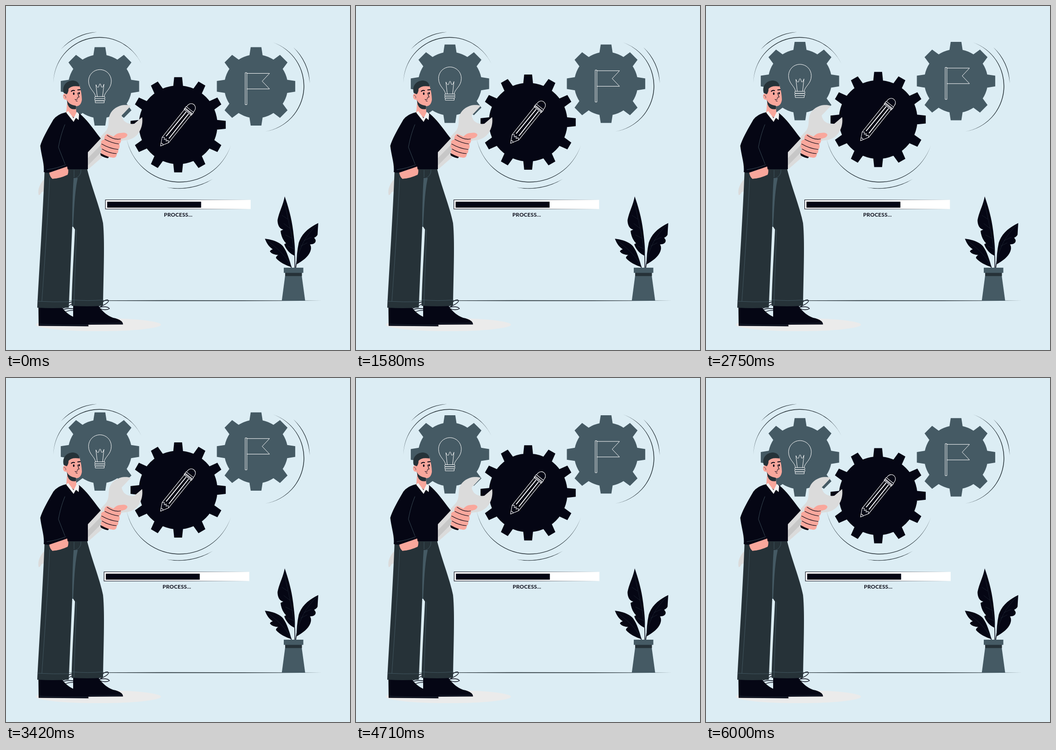
Animation of 748x748 px, one loop 6.04 s. Source, as an HTML page:

```html
<!DOCTYPE html>
<html lang="en">
<head>
<meta charset="utf-8">
<title>Process</title>
<style>
  html, body { margin: 0; width: 100%; height: 100%; overflow: hidden; background: #dcedf4; }
  svg { display: block; width: 100vw; height: 100vh; stroke-width: 1.1; }
  .ink { fill: #050614; }
  .slate { fill: #263238; }
  .steel { fill: #455a64; }
  .skin { fill: #f9a79c; }
  .metal { fill: #dbdbdb; }
  .icon { fill: none; stroke: #fff; stroke-linejoin: round; stroke-linecap: round; }
  .line { fill: none; stroke: #263238; stroke-linecap: round; }
  .dark { fill: none; stroke: #050614; stroke-linecap: round; }
  .seam { fill: none; stroke: #455a64; stroke-linecap: round; }
  text { font: 700 11.7px Lato, "Open Sans", sans-serif; letter-spacing: .25px; text-anchor: middle; }
</style>
</head>
<body>
<svg viewBox="0 0 748 748">
  <defs>
    <linearGradient id="fade" gradientUnits="userSpaceOnUse" x1="216" y1="0" x2="532" y2="0">
      <stop offset="0" stop-color="#050614"/>
      <stop offset=".5" stop-color="#050614" stop-opacity=".75"/>
      <stop offset="1" stop-color="#050614" stop-opacity="0"/>
    </linearGradient>
  </defs>

  <ellipse cx="201" cy="693" rx="136" ry="14" fill="#ebebeb"/>
  <path class="slate" d="M60 640.5Q374 639 687 640.8Q374 642.4 60 640.5Z"/>
  <g id="arcs" class="slate"></g>

  <g id="gears">
    <path id="left" class="steel"/>
    <path id="right" class="steel"/>
    <path id="middle" class="ink"/>

    <g class="icon" stroke-width="1">
      <path d="M194.500 197C194 186 179.500 181 179.500 163A24.700 24.700 0 0 1 229 163C229 181 214.500 186 213.500 197"/>
      <path d="M198.500 197L195.500 171Q200 182 202.500 173Q204.500 165 206.500 173Q209 182 213 170L210 197"/>
      <rect x="193" y="197" width="22" height="4.500" rx="1.500"/>
      <rect x="193" y="201.500" width="22" height="4.500" rx="1.500"/>
      <path d="M194.500 206H213.500V210.500H194.500Z"/>
    </g>
    <g class="icon" stroke-width="1">
      <rect x="520.500" y="145" width="3.300" height="69.500"/>
      <path d="M524 146.500H573L557 163.500L573 180.300H524"/>
    </g>
    <g class="icon" transform="translate(336 304.500) rotate(-51.200)">
      <path d="M0 0L17 -9.200H96V9.200H17Z"/>
      <path d="M17 -9.200L20 -5.500L16 -2.500L20 0L16 2.500L20 5.500L17 9.200M5.500 -3L7 0L5.500 3"/>
      <path stroke-width="1.900" d="M25 -3.800L92 -3.200M25 4L92 3.600"/>
      <rect x="94" y="-10.500" width="4" height="21" rx="1.500"/>
      <rect x="98" y="-10.500" width="4" height="21" rx="1.500"/>
      <path d="M102 -9.500H106C119 -8.500 119 8.500 106 9.500H102"/>
    </g>
  </g>

  <g id="bar">
    <path fill="#fff" d="M216 421.500H532V441.500H216Z"/>
    <path fill="none" stroke="url(#fade)" d="M532 421.500H216.200V441.500H532"/>
    <path class="ink" d="M220 425.500H424.300V438.500H220Z"/>
    <text class="ink" x="374.500" y="458">PROCESS...</text>
  </g>

  <g id="plant">
    <path class="dark" stroke-width="1.500" d="M628 570C629 545 627 525 621 495M621 570C613 549 600 533 582 520M630 570C632 547 641 527 656 504"/>
    <path class="ink" d="M606 414C613 434 621 460 624.500 490C627 510 629 528 628 543C618 540 608 528 605 518L609 516C602 509 598 499 597 489L603 486C594 485 590 474 590.500 465C594 447 603 432 606 414Z"/>
    <path class="ink" d="M679 472C660 481 643 494 636.500 515C633 531 632 547 631.500 562C645 554 657 546 662 533Q665 524 661 518.500Q669 518 671.500 515Q676 510 670 504Q676 501 677.500 497Q678 486 679 472Z"/>
    <path class="ink" d="M563 506C579 508 594 513 602 522C611 534 616 551 621 568C609 564 594 557 587 548Q587 544 592 541.500Q579 541 574 534Q574 531 580 529C571 523 567 516 563 506Z"/>
    <g class="seam" stroke-width=".5" opacity=".6">
      <path d="M605 425C612 460 624 505 627.500 540M677 475C651 500 637 526 632 560M565 508C587 524 607 541 620 566"/>
      <path d="M612 463L600 455M617 483L604 473M622 505L608 498M626 528L613 522M641 522L655 515M648 510L664 503"/>
    </g>
    <path class="steel" d="M607 586H643L650.500 641H599.700Z"/>
    <path class="slate" d="M607 580H643.500V587.300H607Z"/>
    <path class="steel" d="M604 569H646.500V580.300H604Z"/>
  </g>

  <g id="wrench" class="metal">
    <path d="M271.500 217C254 211 233 220 226 236C221 247 226 261 217 272L174 319V354H180L246 297C252 290 260 294 272 289C289 283 299 262 296 241.500L279 256Q266 258 257 250Q252 244 251.500 238Z"/>
    <path fill="#c7c7c7" d="M176 333L214 294L222 302L177 348Z"/>
    <path d="M88 372C75 383 68 397 71 411Q75 411 77 405Q83 403 88 399Z"/>
  </g>

  <g id="shoes">
    <path class="ink" d="M146 652L201 652C210 665 220 673 233 678Q254 682 254.500 692.500L176 693L146 682Z"/>
    <path class="ink" d="M70.500 656L121 655C133 670 143 676 161 681Q179 686 179.500 696.500L71 695.500Z"/>
    <path class="seam" stroke-width=".5" d="M72 692Q125 695 178 693.500M181 690Q220 691 253 689.500"/>
    <path class="dark" stroke-width="1.300" d="M118 657Q134 644 146 643Q148 648 122 658M122 661Q137 655 151 660M127 666Q137 661 148 662"/>
    <path class="dark" stroke-width="1.300" d="M200 655Q213 638 221 639Q229 643 203 655Q221 652 225 658Q217 663 204 658"/>
  </g>

  <g id="trousers">
    <path class="slate" d="M146 353H176C185 390 205 440 211 472C215 510 212 580 211 652Q177 654 142.500 652C144 590 148 530 150 486L144 477Z"/>
    <path class="slate" d="M84 353H170L157 395C148 420 147 445 144 480L136.500 656Q101 658 68 656C72 575 81 440 84 353Z"/>
    <path class="steel" d="M147 374L156 374C150 400 148 440 146 480H144C144 440 145 405 147 374Z"/>
    <path class="seam" stroke-width=".9" d="M153 487C152 540 149 600 148 650M95 374C91 460 83 570 78 642M69 642Q104 644 137 643M144 639Q178 642 211 639M163 356Q164 370 150 375M148 357V372"/>
  </g>

  <g id="body">
    <path class="skin" d="M94 362L132 346Q138 358 134 367Q117 375 101 376Q95 371 94 362Z"/>
    <path class="line" d="M101 376.500Q119 376 134 368"/>
    <path class="skin" d="M133 208L152 218L153 233L147 246L131 233Z"/>
    <path class="ink" d="M131 231Q112 235 103 247C92 266 79 288 74.500 304C77 326 84 344 82 361Q90 364 98 361L133 349L134 355H178V318L206 288C190 268 179 250 159 233L151 245Z"/>
    <path class="seam" stroke-width=".8" d="M128 258C121 275 117 291 114 307Q121 325 128 343M89 356Q111 353 130 345"/>
    <path fill="#f2f2f2" d="M131 232L135 228L147 244L154 230L159 235L158 248L152 243L147 252Z"/>
  </g>

  <g id="head">
    <path class="skin" d="M134 172Q149 168 160 173Q165 191 165 204Q163 218 152 218Q136 220 132 204Q123 204 124 194Q127 188 133 190Z"/>
    <path class="slate" d="M132 202Q134 214 152 217V224Q139 227 134 214Z"/>
    <path class="slate" d="M125.500 189C121 172 133 162 146 162Q158 163 160 175Q143 172 136 180Q136 188 132 192Z"/>
    <path class="line" stroke-width=".8" d="M126 194Q131 195 130 200"/>
    <ellipse class="ink" cx="147.300" cy="190.500" rx="1.700" ry="2.700"/>
    <ellipse class="ink" cx="159" cy="189.500" rx="1.600" ry="2.600"/>
    <path class="dark" stroke-width="1.900" d="M142 185.500Q145 182.500 149 184M156 182.500L161.500 182"/>
    <path class="dark" d="M155.500 189Q157 194 159 198L155 199M150 203Q153 205 156 201M152 206L155 207"/>
  </g>

  <g id="hand">
    <path class="ink" d="M205 320L224 327L222 331Q214 330 206 325Z"/>
    <path class="skin" d="M216 281Q219 276 225 280L234 284Q240 276 250 276Q262 274 264 280Q264 286 250 289Q251 297 246 300Q249 307 244 312Q245 319 241 321Q241 330 233 330Q219 328 208 321Q204 316 209 311Q203 306 207 299Q205 292 214 290Q213 284 216 281Z"/>
    <path class="dark" d="M215 290Q230 298 245 300M208 300Q225 310 244 312M209 311Q223 320 240 321M220 281Q235 292 249 289"/>
  </g>
</svg>
<script>
  const $ = id => document.getElementById(id);

  // Gear outline: a disc plus evenly spaced tapered teeth.
  function gear(id, cx, cy, disc, outer, count, top, base) {
    let d = `M${cx - disc} ${cy}a${disc} ${disc} 0 1 1 ${disc * 2} 0a${disc} ${disc} 0 1 1 ${-disc * 2} 0Z`;
    for (let i = 0; i < count; i++) {
      const a = i * 2 * Math.PI / count, c = Math.cos(a), s = Math.sin(a);
      const corners = [[-base, 3 - disc], [-top, -outer], [top, -outer], [base, 3 - disc]];
      d += 'M' + corners.map(([x, y]) =>
        `${(cx + x * c - y * s).toFixed(2)} ${(cy + x * s + y * c).toFixed(2)}`).join('L') + 'Z';
    }
    $(id).setAttribute('d', d);
  }
  gear('left', 204.3, 174.7, 69.3, 85.2, 8, 11.6, 14.5);
  gear('right', 543.7, 174.7, 69.3, 85.2, 8, 11.6, 14.5);
  gear('middle', 374.3, 258.3, 85.5, 103.5, 12, 8.6, 10.8);

  // Motion arcs taper at both ends: two arcs over one chord.
  function taper([x1, y1, x2, y2, rise]) {
    const half = Math.hypot(x2 - x1, y2 - y1) / 2;
    const radius = h => (half * half + h * h) / (2 * h);
    const r = radius(rise), q = radius(rise - 1.5);
    return `M${x1} ${y1}A${r} ${r} 0 0 1 ${x2} ${y2}A${q} ${q} 0 0 0 ${x1} ${y1}Z`;
  }
  $('arcs').innerHTML = [
    [103, 167, 294, 125, 78], [119, 94.5, 198, 56.5, 9],
    [580, 79, 564, 273, 76.5], [625, 90, 660.5, 168, 9],
    [489, 303, 262, 287, 88.5], [450, 376, 349, 394.5, 10]
  ].map(a => `<path d="${taper(a)}"/>`).join('');

  const LOOP = 6040, STEP = 1000 / 24;
  const lift = [[0, 0], [430, 0], [3440, -14.9], [6440, 0]];
  const shift = [[0, 0], [790, 0], [1580, -3.4], [2750, -1.6], [4080, -4.4], [5330, -1.1], [6000, 0], [6040, 0]];

  function at(keys, t) {
    const i = keys.findIndex(k => k[0] > t);
    const [t0, v0] = keys[i - 1], [t1, v1] = keys[i];
    return v0 + (v1 - v0) * (t - t0) / (t1 - t0);
  }

  const start = performance.now();
  function draw(now) {
    const elapsed = Math.max(0, now - start) % LOOP;
    const t = Math.min(144, Math.floor((elapsed + 5) / STEP)) * STEP;
    $('gears').setAttribute('transform', `translate(0 ${at(lift, t).toFixed(2)})`);
    $('bar').setAttribute('transform', `translate(${at(shift, t).toFixed(2)} 0)`);
    requestAnimationFrame(draw);
  }
  draw(start);
</script>
</body>
</html>
```
